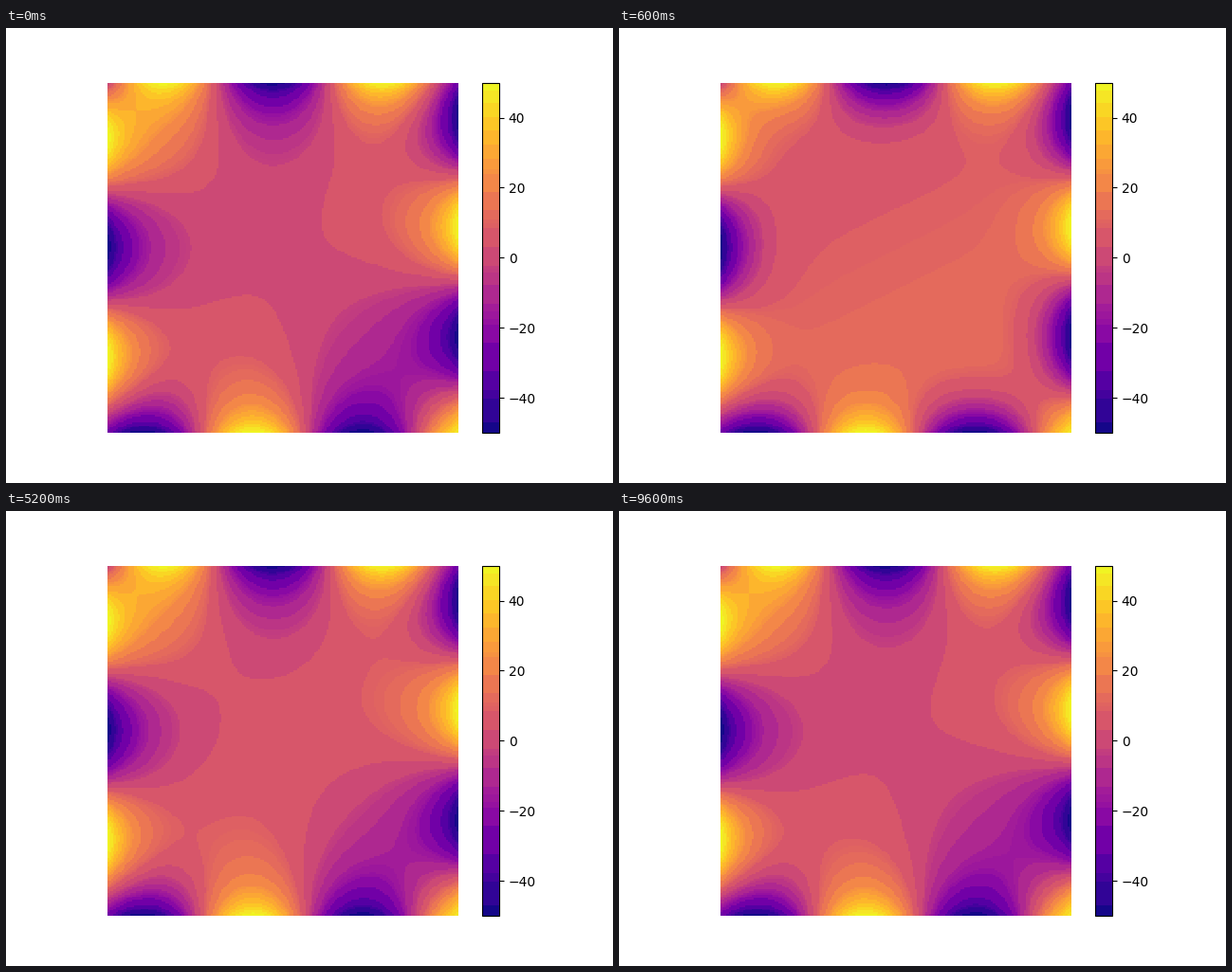
These frames come from a looping animation (640x480 px, 9700 ms). A matplotlib script:

```python
import numpy as np
import matplotlib.pyplot as plt
from matplotlib.animation import FuncAnimation
from matplotlib.colors import ListedColormap

N = 200            # grid points per side
STATES = 100       # length of the simulated run
FRAMES = 97
DT = 0.001         # diffusion time between states
LIMIT = 50

x = np.linspace(0, 1, N)
X, Y = np.meshgrid(x, x)
edge = LIMIT * np.sin(10 * (X + Y))
start = 2.5 + 5 * X + 10 * Y

# Sine modes of the interior diagonalise the five-point Laplacian.
m = N - 2
h = x[1]
n = np.arange(1, m + 1)
S = np.sqrt(2 / (m + 1)) * np.sin(np.pi * np.outer(n, n) / (m + 1))
lam = (2 - 2 * np.cos(np.pi * n / (m + 1))) / h**2
rate = lam[:, None] + lam[None, :]


def transform(a):
    return S @ a @ S


# Fixed edges act as a heat source on the neighbouring interior points.
source = np.zeros((m, m))
source[0] += edge[0, 1:-1]
source[-1] += edge[-1, 1:-1]
source[:, 0] += edge[1:-1, 0]
source[:, -1] += edge[1:-1, -1]
steady = transform(source / h**2) / rate
excess = transform(start[1:-1, 1:-1]) - steady


def field(state):
    """Temperature after the given number of states."""
    u = edge.copy()
    u[1:-1, 1:-1] = transform(steady + excess * np.exp(-rate * DT * state))
    return u


def banded_plasma(u):
    """Plasma merged into coarse RGB cells, each with its mean colour."""
    rgb = plt.get_cmap("plasma")(np.arange(256), bytes=True)[:, :3].astype(int)
    level = np.clip((u + LIMIT) / (2 * LIMIT) * 256, 0, 255).astype(int)
    weight = 27 + 3.4 * np.bincount(level.ravel(), minlength=256)
    cell = (rgb[:, 0] >> 5) * 256 + (rgb[:, 1] >> 4) * 8 + (rgb[:, 2] >> 5)
    out = np.empty((256, 3))
    for c in np.unique(cell):
        same = cell == c
        out[same] = np.average(rgb[same], axis=0, weights=weight[same])
    return ListedColormap(np.floor(out) / 255)


last = field(STATES - 1)
fig, ax = plt.subplots(figsize=(6.4, 4.8), dpi=100)
image = ax.imshow(last, cmap=banded_plasma(last), vmin=-LIMIT, vmax=LIMIT,
                  interpolation="nearest")
ax.axis("off")
fig.colorbar(image, ax=ax)


def update(k):
    # The loop opens on the final state, then runs from the start.
    image.set_data(field((k - 1) % STATES))
    return [image]


anim = FuncAnimation(fig, update, frames=FRAMES, interval=100,
                     repeat=True, repeat_delay=0)
plt.show()
```
